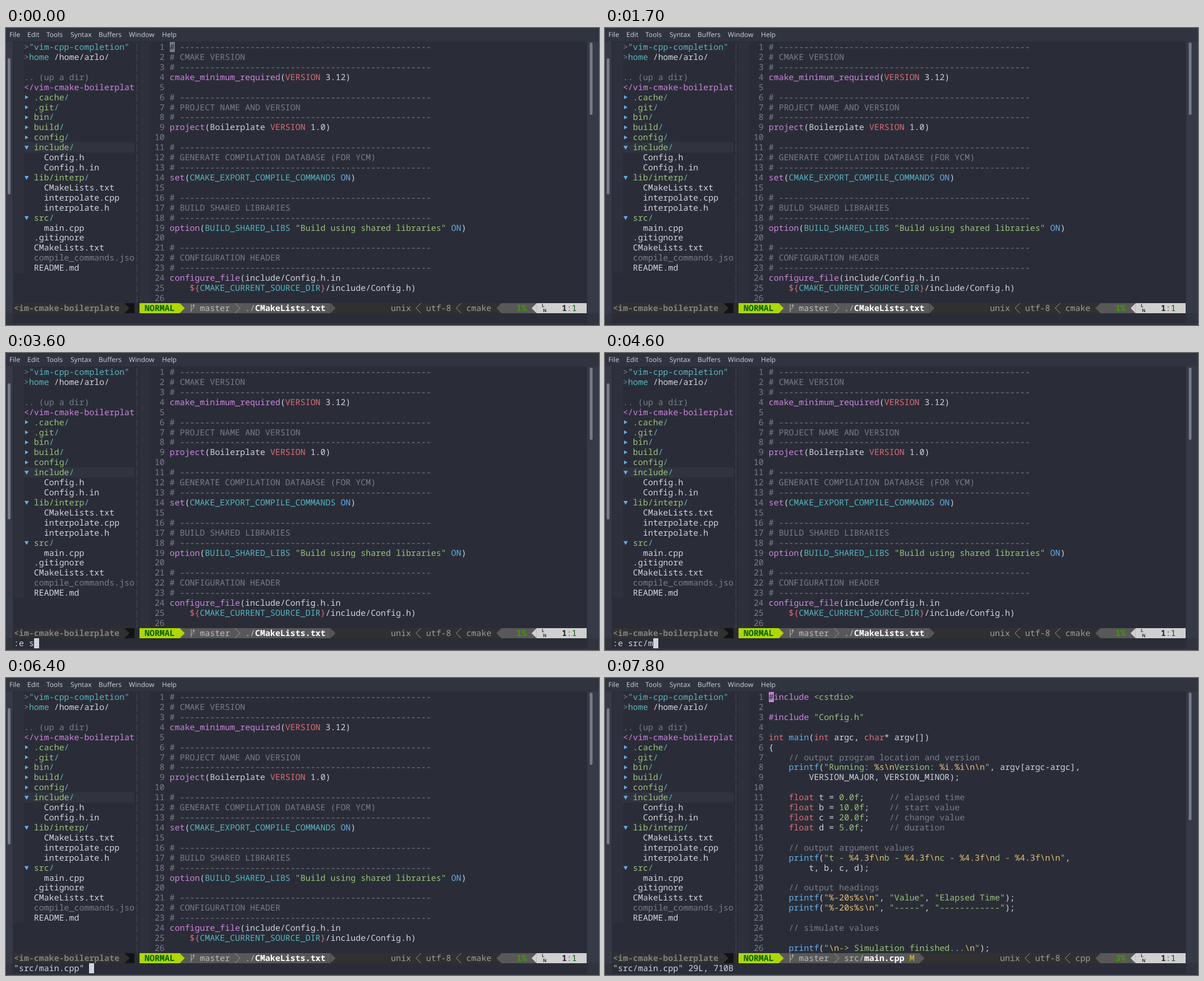
Animation of 1057x530 px, one loop 8000 ms. Source, as an HTML page with a canvas:

```html
<!DOCTYPE html>
<html lang="en">
<head>
<meta charset="utf-8">
<style>
html, body { margin: 0; width: 100%; height: 100%; overflow: hidden; background: #2f343f; }
canvas { display: block; }
</style>
</head>
<body>
<canvas id="stage" width="1057" height="530"></canvas>
<script>
const ctx = document.getElementById('stage').getContext('2d');
ctx.textRendering = 'geometricPrecision';
const LOOP = 8000, CELL_W = 8.96, CELL_H = 17.92, LEFT = 14, TOP = 25;
const STATUS = 26, COMMAND = 27;
const BG = '#2a2d37', GUTTER = '#2e313c', FRAME = '#363a46', THUMB = '#767b88';
const COLORS = {
  d: '#d0d4dc', k: '#797e8b', p: '#d083e2', r: '#e06c75',
  c: '#56b6c2', g: '#98c379', b: '#61afef', y: '#e5c07b'
};
const RULE = '^k# ' + '-'.repeat(50);
const heading = text => [RULE, '^k# ' + text, RULE];

// A caret and a letter switch the text colour.
const cmake = [
  ...heading('CMAKE VERSION'),
  '^pcmake_minimum_required^d(^rVERSION^d 3.12)',
  '',
  ...heading('PROJECT NAME AND VERSION'),
  '^pproject^d(Boilerplate ^rVERSION^d 1.0)',
  '',
  ...heading('GENERATE COMPILATION DATABASE (FOR YCM)'),
  '^pset^d(^cCMAKE_EXPORT_COMPILE_COMMANDS ^bON^d)',
  '',
  ...heading('BUILD SHARED LIBRARIES'),
  '^poption^d(^cBUILD_SHARED_LIBS ^g"Build using shared libraries" ^bON^d)',
  '',
  ...heading('CONFIGURATION HEADER'),
  '^pconfigure_file^d(include/Config.h.in',
  '    ^r${^cCMAKE_CURRENT_SOURCE_DIR^r}^d/include/Config.h)',
  ''
];

const cpp = String.raw`^p#include ^g<cstdio>

^p#include ^g"Config.h"

^rint ^bmain^d(^rint^d argc, ^rchar^d* argv[])
{
    ^k// output program location and version
    ^bprintf^d(^g"Running: ^y%s\n^gVersion: ^y%i^g.^y%i\n\n^g"^d, argv[argc-argc],
        VERSION_MAJOR, VERSION_MINOR);

    ^rfloat^d t = ^g0.0f^d;     ^k// elapsed time
    ^rfloat^d b = ^g10.0f^d;    ^k// start value
    ^rfloat^d c = ^g20.0f^d;    ^k// change value
    ^rfloat^d d = ^g5.0f^d;     ^k// duration

    ^k// output argument values
    ^bprintf^d(^g"t - ^y%4.3f\n^gb - ^y%4.3f\n^gc - ^y%4.3f\n^gd - ^y%4.3f\n\n^g"^d,
        t, b, c, d);

    ^k// output headings
    ^bprintf^d(^g"^y%-20s%s\n^g"^d, ^g"Value"^d, ^g"Elapsed Time"^d);
    ^bprintf^d(^g"^y%-20s%s\n^g"^d, ^g"-----"^d, ^g"------------"^d);

    ^k// simulate values

    ^bprintf^d(^g"^y\n^g-> Simulation finished...^y\n^g"^d);`.split('\n');

const dir = (name, open) => ({ open, text: '  ^g' + name + '^c/' });
const tree = [
  '^k>^c"vim-cpp-completion"',
  '^k>^chome ^d/home/arlo/',
  '',
  '^k.. (up a dir)',
  '^p</vim-cmake-boilerplat',
  dir('.cache'), dir('.git'), dir('bin'), dir('build'), dir('config'),
  dir('include', true),
  '    Config.h', '    Config.h.in',
  dir('lib/interp', true),
  '    CMakeLists.txt', '    interpolate.cpp', '    interpolate.h',
  dir('src', true),
  '    main.cpp',
  '  .gitignore', '  CMakeLists.txt', '  ^kcompile_commands.jso', '  README.md'
];

// [start, command line, cursor visible]
const commands = [
  [0, '', false], [2000, ':', true], [2300, ':e', true], [3000, ':e ', true],
  [3400, ':e ', false], [3600, ':e s', true], [3700, ':e sr', true],
  [4000, ':e src/', true], [4600, ':e src/m', true], [4700, ':e src/ma', true],
  [4900, ':e src/mai', true], [5400, ':e src/main.cpp', true],
  [6100, ':e src/main.cpp', false], [6400, '"src/main.cpp" ', true],
  [6500, '"src/main.cpp" 29L, 710B', false]
];
// Times at which the editor cursor toggles, starting visible.
const blinks = [400, 600, 1000, 1300, 1700, 1800, 2000, 6500, 7600, 7800];

const cellX = col => LEFT + col * CELL_W;
const cellY = row => TOP + row * CELL_H;

function rect(x, y, w, h, color) {
  ctx.fillStyle = color;
  ctx.fillRect(x, y, w, h);
}

function cells(col, row, count, color, rows = 1) {
  const x = Math.round(cellX(col)), y = Math.round(cellY(row));
  rect(x, y, Math.round(cellX(col + count)) - x, Math.round(cellY(row + rows)) - y, color);
}

function shape(points, color, stroke) {
  ctx.beginPath();
  points.forEach(([x, y]) => ctx.lineTo(x, y));
  if (stroke) {
    ctx.strokeStyle = color;
    ctx.lineWidth = 1;
    ctx.stroke();
  } else {
    ctx.fillStyle = color;
    ctx.fill();
  }
}

function write(col, row, text, color, bold) {
  ctx.font = (bold ? 'bold ' : '') + '14.93px "Noto Sans Mono", monospace';
  ctx.fillStyle = color;
  [...text].forEach((ch, i) => {
    if (ch !== ' ') ctx.fillText(ch, cellX(col + i), cellY(row) + 14);
  });
}

function rich(col, row, line) {
  line.split(/\^(?=[a-z])/).forEach((part, i) => {
    const text = i ? part.slice(1) : part;
    write(col, row, text, COLORS[i ? part[0] : 'd']);
    col += text.length;
  });
}

// Powerline divider filling one cell; side 1 points right, -1 left.
function divider(col, side, color, thin) {
  const a = cellX(side > 0 ? col : col + 1), y = Math.round(cellY(STATUS));
  shape([[a, y], [a + side * CELL_W, y + 9], [a, y + 18]], color, thin);
}

function drawMenu() {
  rect(0, 0, 1057, 24, '#2f343f');
  ctx.font = '12px "Noto Sans", sans-serif';
  ctx.fillStyle = '#c4c9d3';
  const items = { File: 6, Edit: 38, Tools: 72, Syntax: 115, Buffers: 165, Window: 219, Help: 278 };
  for (const name in items) ctx.fillText(name, items[name], 16);
}

function drawFrame(loaded) {
  rect(0, 0, 1057, 530, '#2f343f');
  rect(0, 24, 1057, 485, FRAME);
  rect(12, 24, 1024, 503, BG);
  ctx.fillStyle = THUMB;
  ctx.beginPath();
  ctx.roundRect(3, 54, 5, 243, 2.5);
  ctx.roundRect(1040.5, 26, 5, loaded ? 228 : 129, 2.5);
  ctx.fill();
  drawMenu();
}

function drawTree() {
  cells(0, 0, 2, GUTTER, 23);
  cells(2, 10, 22, '#30343f');
  tree.forEach((item, row) => {
    rich(2, row, item.text || item);
    if (!item.text) return;
    const x = 33, y = cellY(row) + 9;
    shape(item.open
      ? [[x, y - 3], [x + 7.5, y - 3], [x + 3.75, y + 4]]
      : [[x + 1, y - 3.5], [x + 7, y], [x + 1, y + 3.5]], COLORS.b);
  });
  for (let row = 0; row < 26; row++) write(24, row, '|', '#474b57');
}

function drawCode(lines, cursor) {
  cells(25, 0, 2, GUTTER, 26);
  lines.forEach((line, row) => {
    write(28, row, String(row + 1).padStart(2), COLORS.k);
    rich(31, row, line);
  });
  if (cursor) {
    cells(31, 0, 1, COLORS[lines[0][1]]);
    write(31, 0, '#', BG);
  }
}

function drawStatus(loaded) {
  const [path, file, type, percent] = loaded
    ? ['src/', 'main.cpp', 'cpp', '3%'] : ['./', 'CMakeLists.txt', 'cmake', '1%'];
  const DARK = '#303030', MID = '#585858', LIGHT = '#d0d0d0', GREEN = '#afd700', SOFT = '#9e9e9e';

  cells(0, STATUS, 24, '#121212');
  cells(0, STATUS, 22, DARK);
  divider(22, 1, DARK);
  write(0, STATUS, '<im-cmake-boilerplate', '#808080', true);

  const fileCol = 46 + path.length, end = fileCol + file.length + (loaded ? 3 : 1);
  cells(25, STATUS, 89, DARK);
  cells(33, STATUS, end - 33, MID);
  cells(25, STATUS, 8, GREEN);
  divider(33, 1, GREEN);
  divider(end, 1, MID);
  write(26, STATUS, 'NORMAL', '#005f00', true);
  shape([[330, 493], [330, 507]], '#bcbcbc', true);
  shape([[330, 503], [334.5, 499], [334.5, 494]], '#bcbcbc', true);
  shape([[332.5, 496.5], [334.5, 493.5], [336.5, 496.5]], '#bcbcbc', true);
  write(37, STATUS, 'master', '#bcbcbc');
  divider(44, 1, SOFT, true);
  write(46, STATUS, path, '#bcbcbc');
  write(fileCol, STATUS, file, '#ffffff', true);
  if (loaded) write(end - 2, STATUS, 'M', '#e6c619');

  const typeCol = 95 - type.length;
  write(typeCol - 15, STATUS, 'unix', SOFT);
  divider(typeCol - 10, -1, SOFT, true);
  write(typeCol - 8, STATUS, 'utf-8', SOFT);
  divider(typeCol - 2, -1, SOFT, true);
  write(typeCol, STATUS, type, SOFT);
  cells(97, STATUS, 7, MID);
  divider(96, -1, MID);
  write(100, STATUS, percent, '#3f9a00', true);
  cells(104, STATUS, 10, LIGHT);
  divider(103, -1, LIGHT);
  ctx.font = 'bold 8px "Noto Sans", sans-serif';
  ctx.fillStyle = '#303030';
  ctx.fillText('L', 955, 498);
  ctx.fillText('N', 957, 507);
  write(109, STATUS, '1', '#262626', true);
  write(110, STATUS, ':', '#606060');
  write(111, STATUS, '1', '#006000');
}

function drawCommand(t) {
  const [, text, cursor] = commands.findLast(c => c[0] <= t);
  write(0, COMMAND, text, COLORS.d);
  if (cursor) cells(text.length, COMMAND, 1, COLORS.d);
}

function draw(now) {
  const t = now % LOOP, loaded = t >= 6500;
  const cursor = blinks.filter(b => b <= t).length % 2 === 0;
  drawFrame(loaded);
  drawTree();
  drawCode(loaded ? cpp : cmake, cursor);
  drawStatus(loaded);
  drawCommand(t);
  requestAnimationFrame(draw);
}
requestAnimationFrame(draw);
</script>
</body>
</html>
```
